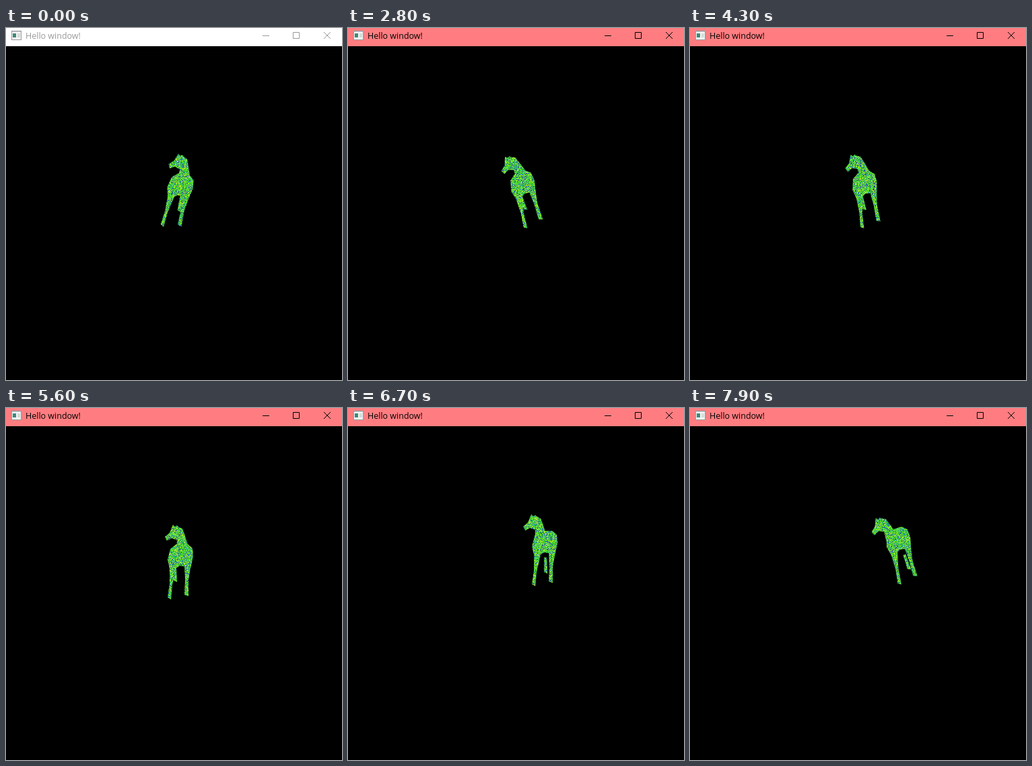
Write an HTML page with a canvas that moves like this. It is 499 px wide and 522 px high and loops after 8000 ms.

```html
<!DOCTYPE html>
<html lang="en">
<head>
<meta charset="utf-8">
<title>Hello window!</title>
<style>
  html, body { margin: 0; width: 499px; height: 522px; overflow: hidden; background: #000; }
  canvas, #bar, #bar * { position: absolute; left: 0; top: 0; }
  #bar { width: 499px; height: 27px; background: #ff7d80; color: #000; }
  #bar.idle { background: #fff; color: #999; }
  #bar span { left: 29px; top: 3px; font: 12.5px/17px "Open Sans", "Noto Sans", sans-serif; white-space: pre; }
</style>
</head>
<body>
<canvas id="view" width="499" height="522"></canvas>
<div id="bar">
  <svg width="499" height="27">
    <rect x="8.5" y="4.5" width="14" height="13" fill="#f4f4f4" stroke="#999"/>
    <path d="M9 5.5h13" stroke="#ccd"/>
    <path d="M10 8h5v6h-5z" fill="#3d8a78"/>
    <path d="M17 8h4v6h-4z" fill="#d5dcd8"/>
    <path d="M381 11.5h10M426.5 6.5h9v9h-9zM472 6l10 10M482 6l-10 10" fill="none" stroke="currentColor"/>
  </svg>
  <span>Hello window!</span>
</div>
<script>
const LOOP = 8000, STEP = 100, TILE = 128;
const bar = document.getElementById('bar');
const ctx = document.getElementById('view').getContext('2d');

// Horse parts, relative to the middle of the body.
const head = new Path2D('M-21-29L-18-23-11-27-3-24-4-10 10-10 13-18 8-33 5-41-1-44-3-46-6-44-9-47-14-35z');
const body = new Path2D('M-4-18L-13-11-17 5-14 18-14 40-17 61-12 64-10 42-4 17 1 14 8 15 9 35 8 57 14 59 14 35 17 18 21 0 20-12 13-18z');
const hindLeg = new Path2D('M-8 14L-8 36-3 38-4 14z');

// Time, centre x, centre y, lean in degrees, yaw in pixels of parallax.
const keys = [
  [0, 257, 234, -10, 0], [1700, 257, 234, -10, 0],
  [1800, 257, 234, -8, 0], [2200, 257, 234, -8, 0],
  [3000, 257, 232, 28, 0], [3500, 257, 232, 28, 0],
  [3600, 257, 232, 26.5, 0], [3900, 257, 232, 26.5, 0],
  [4600, 257, 232, 1, 0], [5000, 257, 232, 1, 0],
  [5100, 257, 232, 0, 0], [5500, 257, 232, 0, 0],
  [5600, 257, 220, 0, 0], [5900, 259, 202, 0, 0], [6400, 259, 202, 0, 0],
  [6900, 311, 199, 0, 15], [7100, 311, 199, 0, 15],
  [7200, 311, 199, 2, 15], [7600, 311, 199, 2, 15],
  [7900, 307, 197, 17, 11]];

function poseAt(t) {
  const i = Math.max(1, keys.findIndex(k => k[0] >= t));
  const a = keys[i - 1], b = keys[i];
  const f = (t - a[0]) / (b[0] - a[0]);
  return a.map((v, j) => v + (b[j] - v) * f).slice(1);
}

function makeNoise() {
  const tile = document.createElement('canvas');
  tile.width = tile.height = TILE;
  const g = tile.getContext('2d');
  const colors = ['#3c3', '#3c3', '#5d1', '#5d1', '#2a4', '#9e1', '#ce3', '#36c', '#2b9', '#7d7', '#248'];
  let seed = 7;
  for (let i = 0; i < TILE * TILE; i++) {
    seed = seed * 16807 % 2147483647;
    g.fillStyle = colors[seed % colors.length];
    g.fillRect(i % TILE, Math.floor(i / TILE), 1, 1);
  }
  return ctx.createPattern(tile, 'repeat');
}
const noise = makeNoise();

function drawHorse([x, y, lean, yaw]) {
  const shift = Math.round(x * 5 + y * 7 + lean * 11);
  const drawPart = (path, dx, dy) => {
    ctx.setTransform(new DOMMatrix().translate(x, y).rotate(-lean).translate(dx, dy));
    // Keep the grain aligned to screen pixels.
    noise.setTransform(ctx.getTransform().inverse().translate(shift, shift * 3));
    ctx.fillStyle = noise;
    ctx.fill(path);
  };
  drawPart(hindLeg, yaw + 1.2 * Math.max(0, -lean), yaw * 0.8);
  drawPart(body, 0, 0);
  drawPart(head, -yaw, yaw * 0.5);
  ctx.resetTransform();
}

function frame() {
  const t = Math.floor(performance.now() % LOOP / STEP) * STEP;
  bar.className = t < 300 ? 'idle' : '';
  ctx.imageSmoothingEnabled = false;
  ctx.fillStyle = '#000';
  ctx.fillRect(0, 0, 499, 522);
  drawHorse(poseAt(t));
  requestAnimationFrame(frame);
}
frame();
</script>
</body>
</html>
```
